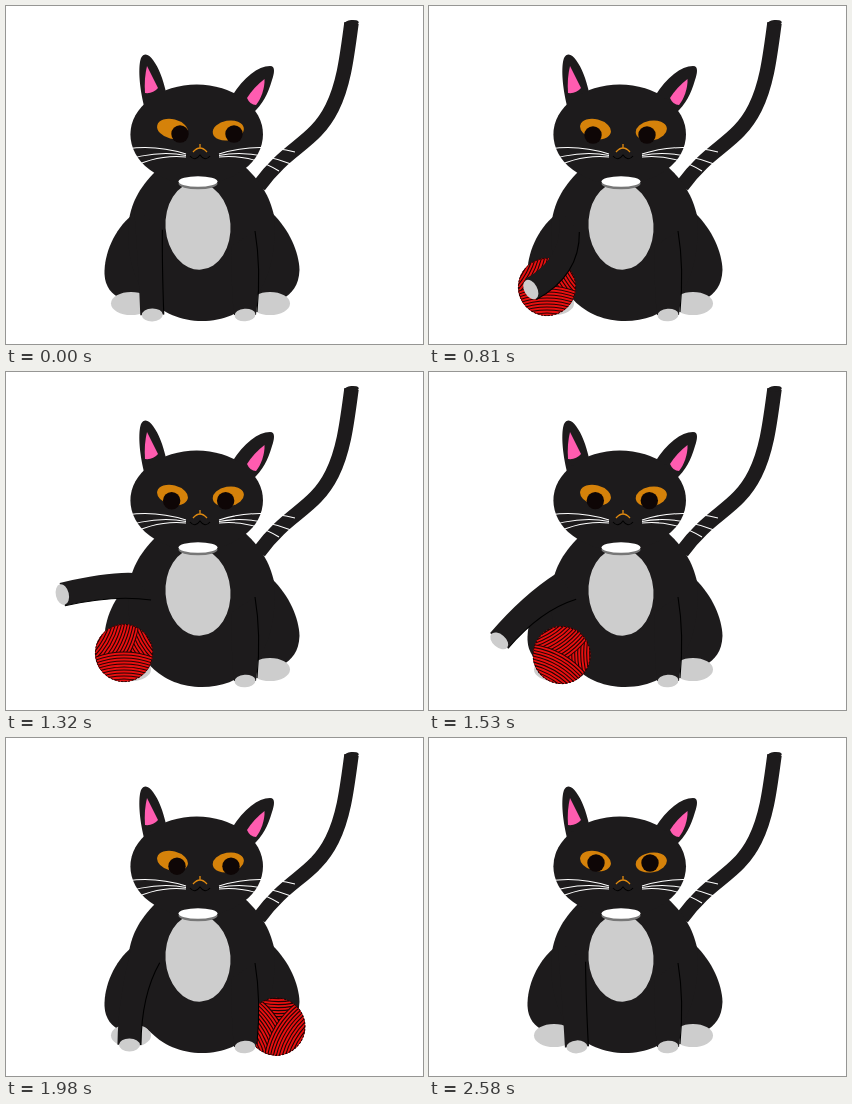
An HTML page for the animation above (2850 ms loop, 417 by 338 pixels).

```html
<!DOCTYPE html>
<html lang="en">
<head>
<meta charset="utf-8">
<title>Cat and yarn</title>
<style>
  html, body { margin: 0; width: 100%; height: 100%; overflow: hidden; background: #fff; }
  svg { display: block; width: 100vw; height: 100vh; }
  .fur { fill: #1d1b1c; }
  .grey { fill: #cdcdcd; }
  .pink { fill: #ff5cb0; }
  .eye { fill: #d5820a; }
  .pupil { fill: #0e0606; }
  .line { fill: none; stroke: #000; stroke-width: 1.1; }
  .tail { fill: none; stroke: #1d1b1c; stroke-width: 14.5; }
  .whisker { fill: none; stroke: #fff; stroke-width: 1.1; }
  .nose { fill: none; stroke: #e08a10; stroke-width: 1.3; }
</style>
</head>
<body>
<svg viewBox="0 0 417 338">
  <defs><clipPath id="round"><circle r="28.8"/></clipPath></defs>

  <path class="tail" d="M345.5 17C341 50 338 78 326 102C308 138 282 140 253 180"/>
  <ellipse class="fur" cx="345.500" cy="17" rx="7.300" ry="3" transform="rotate(-6 345.500 17)"/>

  <path class="fur" d="M126 209C108 224 98 248 98.5 268C99 281 106 289 116 293H150V215Z"/>
  <path class="fur" d="M266 207C283 223 293 246 293.5 264C293 279 286 288 276 293H240V215Z"/>
  <ellipse class="grey" cx="125" cy="297.5" rx="20" ry="11.5"/>
  <ellipse class="grey" cx="264" cy="297.5" rx="20" ry="11.5"/>
  <path class="fur" d="M150 165C132 183 125 198 122.5 217C118 285 155 315 196 315C238 315 272 285 268.5 212C265 195 258 178 238 160Z"/>
  <ellipse class="grey" cx="192" cy="220" rx="32.500" ry="43.700" transform="rotate(-4 192 220)"/>

  <g id="ball"></g>

  <path class="fur" d="M249 225C254 255 253.5 280 250 309H228C226 290 225 265 226 240Z"/>
  <path class="line" d="M249 225C254 255 253.5 280 251 306"/>
  <ellipse class="grey" cx="239" cy="309" rx="10.500" ry="6.300" transform="rotate(-4 239 309)"/>

  <path id="arm" class="fur"/>
  <path id="edge" class="line"/>
  <ellipse id="paw" class="grey" rx="10.500" ry="6.500"/>

  <path class="fur" d="M138 100C133 80 132 60 135 52C138 46 143 48 147 54C153 62 157 73 160 86Z"/>
  <path class="pink" d="M141 60L152 82Q147 88 139 87Q138 72 141 60Z"/>
  <path class="fur" d="M226 90C238 71 252 60 264 60C270 60 268 68 266 74C262 88 257 98 246 108Z"/>
  <path class="pink" d="M258.5 73C259 82 255 93 250 99Q244 99 241 92Q248 81 258.5 73Z"/>
  <ellipse class="fur" cx="190.700" cy="128.500" rx="66.300" ry="50"/>

  <ellipse cx="192" cy="177.800" rx="19.500" ry="5.500" fill="#777"/>
  <ellipse cx="192" cy="175.500" rx="19.500" ry="5.300" fill="#fff"/>

  <ellipse class="eye" cx="166.500" cy="123" rx="15.700" ry="9.800" transform="rotate(14 166.500 123)"/>
  <ellipse class="eye" cx="222.300" cy="124.500" rx="15.700" ry="9.800" transform="rotate(-10 222.300 124.500)"/>
  <g id="pupils" class="pupil"><circle cx="167" r="8.700"/><circle cx="221" r="8.700"/></g>

  <path class="nose" d="M194 138V142M187 146Q194 138 201 146"/>
  <path class="line" d="M184 150Q189 156 194 149Q199 156 204 150"/>
  <path id="whiskers" class="whisker" d="M213 148Q250 136 289 146M213 149.500Q245 143 285 158M213 151Q245 148 273 165"/>
  <use href="#whiskers" transform="translate(393) scale(-1 1)"/>
</svg>

<script>
const LOOP = 2850, STEP = 30, R = 29, REST_X = 118, REACH = 94;
const SHOULDER = { x: 143, y: 215 };
const $ = id => document.getElementById(id);
const rad = deg => deg * Math.PI / 180;
const linear = k => k;
const smooth = k => k * k * (3 - 2 * k);

// Key moments: [time, ...values]
const roll = [[30, 436], [420, 212], [600, REST_X], [1482, REST_X], [2580, 454]];
const gaze = [[0, 7, 128], [420, -3, 129], [810, -3, 129], [1740, 0, 128.5], [2160, 7, 128], [2580, 0, 125]];
// swing away from straight down, arm length, curl of the wrist
const swipe = [
  [540, -2, REACH, 0], [810, 31, 80, 30], [1095, 96, REACH, -10], [1320, 85, 87, -8],
  [1740, 22, REACH, -18], [2220, 2, REACH, -5], [2580, -3, REACH, 0]
];

function tween(keys, t, ease = linear) {
  const i = keys.findIndex(key => key[0] > t);
  if (i <= 0) return keys.at(i).slice(1);
  const a = keys[i - 1], b = keys[i], k = ease((t - a[0]) / (b[0] - a[0]));
  return a.slice(1).map((v, j) => v + (b[j + 1] - v) * k);
}

// A wound layer: a curved red patch with parallel strands
function strands(angle, top) {
  const side = R + 2;
  const arc = y => `M${-side} ${y}Q0 ${y - 12} ${side} ${y}`;
  let d = '';
  for (let y = top; y <= 40; y += 3) d += arc(y);
  return `<g transform="rotate(${angle})">
    <path fill="#e81010" d="${arc(top)}V40H${-side}Z"/>
    <path fill="none" stroke="#200404" stroke-width="1.1" d="${d}"/></g>`;
}

$('ball').innerHTML =
  `<g clip-path="url(#round)">${strands(240, -R)}${strands(120, 1)}${strands(0, 5)}</g>` +
  `<circle r="28.6" fill="none" stroke="#200404" stroke-dasharray="2.2 1.3"/>`;

function drawBall(t) {
  const [x] = tween(roll, t), way = x - REST_X;
  const y = 281 + 8 * (1 - Math.exp(-way / 50));
  $('ball').setAttribute('transform', `translate(${x} ${y}) rotate(${way / R / rad(1)})`);
  $('ball').style.display = t < STEP || t >= 2580 ? 'none' : '';
}

function drawArm(t) {
  const [swing, reach, curl] = tween(swipe, t, smooth);
  const tilt = swing + curl, out = Math.sin(rad(swing));
  const cos = Math.cos(rad(tilt)), sin = Math.sin(rad(tilt));
  const px = SHOULDER.x - reach * out;
  const py = SHOULDER.y + reach * Math.cos(rad(swing));
  // Points beside the paw (along = 0) and further up the forearm
  const at = (across, along) => `${px + across * cos + along * sin} ${py + across * sin - along * cos}`;
  const edge = `M${156 - 11 * out} ${224 + 4 * out}Q${at(11.5, 50)} ${at(11.5, 0)}`;
  $('edge').setAttribute('d', edge);
  $('arm').setAttribute('d', `${edge}L${at(-12, 0)}Q${at(-12, 50)} 128 201Z`);
  $('paw').setAttribute('transform', `translate(${px} ${py}) rotate(${tilt})`);
}

function draw(t) {
  drawBall(t);
  drawArm(t);
  $('pupils').setAttribute('transform', `translate(${tween(gaze, t)})`);
}

const start = performance.now();
function tick() {
  const t = (performance.now() - start) % LOOP;
  draw(Math.floor(t / STEP) * STEP);
  requestAnimationFrame(tick);
}
tick();
</script>
</body>
</html>
```
